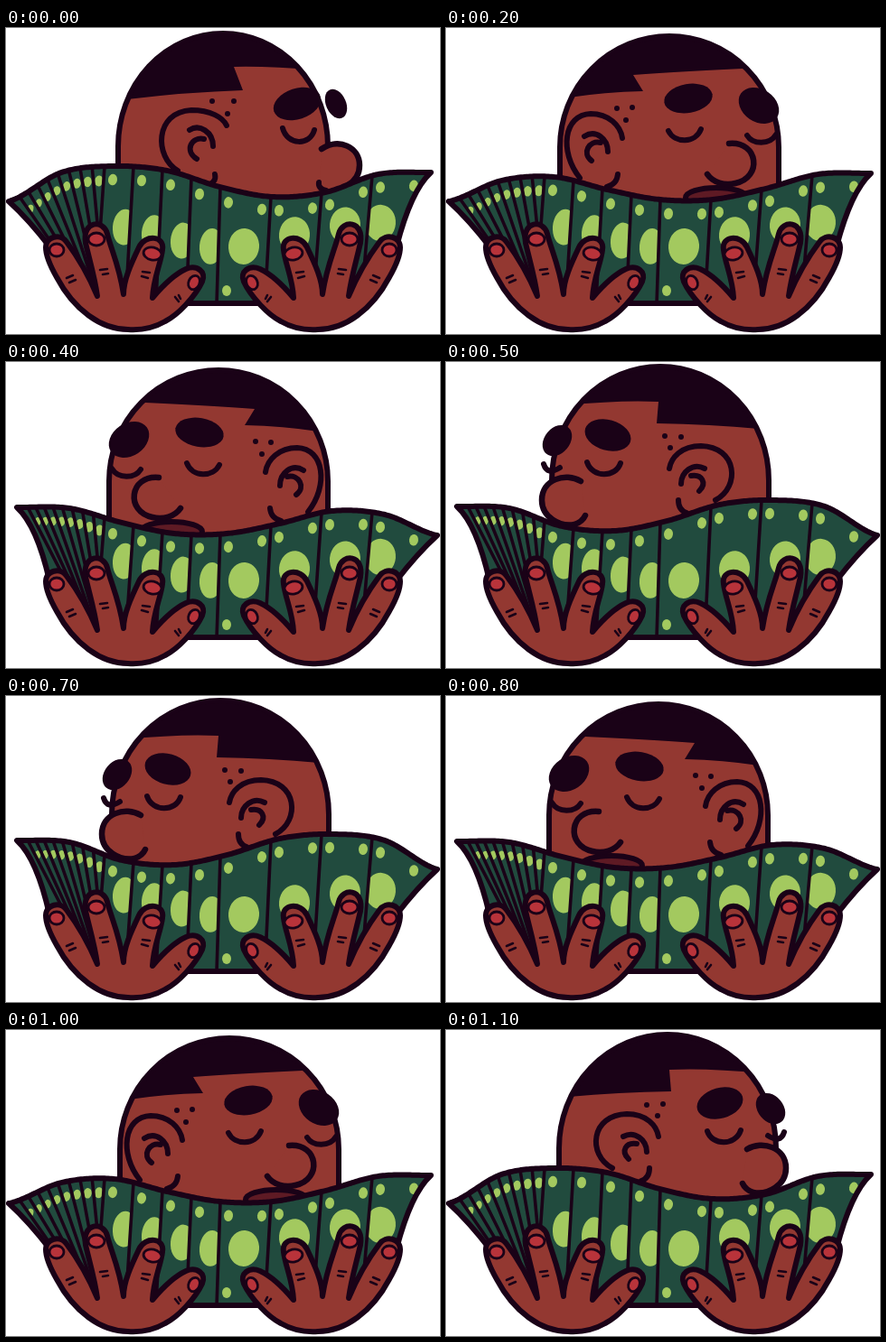
These frames come from a looping animation (480x339 px, 1200 ms). An HTML page with a canvas:

```html
<!DOCTYPE html>
<html lang="en">
<head>
<meta charset="utf-8">
<title>Cash fan</title>
<style>
html, body { margin: 0; width: 100%; height: 100%; overflow: hidden; background: #fff; }
canvas { display: block; }
</style>
</head>
<body>
<canvas id="stage" width="480" height="339"></canvas>
<script>
const ctx = document.getElementById('stage').getContext('2d');
const INK = '#1a0217', SKIN = '#933831', GREEN = '#214b3e', LIME = '#a3c95f', NAIL = '#b8333a', LIP = '#5e1a24';

// Head turns from profile (0) to front (3); later poses reuse them mirrored.
const heads = [
  {
    skull: [240, 131, 116, 125],
    hair: 'M100 84 L134 79 Q200 71 262 69 L252 43 Q290 42 345 47 L345 -5 L100 -5Z',
    brows: [[322, 84, 27, 17, -18], [365, 84, 11, 17, -24]],
    nose: 'M349 134 C368 121 391 132 391 152 C391 164 385 170 378 174',
    chin: 'L380 180 L346 190',
    lines: 'M306 111 C311 130 336 131 341 113 M190 158 C164 143 164 93 205 91 C226 91 240 99 244 108 ' +
      'M203 113 C214 106 229 115 229 131 M219 123 C205 120 197 136 211 145 M231 162 C233 169 228 173 220 175 M346 171 Q345 178 354 180',
    dots: [[228, 81], [252, 81], [245, 95]]
  },
  {
    skull: [245, 131, 120, 126],
    hair: 'M100 80 L136 74 Q190 69 249 68 L247 44 Q290 42 350 48 L350 -5 L100 -5Z',
    brows: [[303, 81, 26, 17, -16], [359, 87, 14, 19, -40]],
    nose: 'M333 132 C350 122 376 130 376 153 C376 172 356 183 340 180 Q331 177 328 170',
    chin: '',
    lines: 'M289 112 C294 128 320 129 326 111 M356 117 Q370 126 374 113 M184 153 C156 138 160 94 200 93 C222 93 233 106 235 118 ' +
      'M196 118 C209 111 222 122 222 135 M211 126 C199 124 193 134 202 143 M225 153 Q225 164 216 167',
    dots: [[222, 83], [240, 82], [234, 95]]
  },
  {
    skull: [247, 132, 121, 123],
    hair: 'M100 83 L136 77 Q175 71 218 70 L207 52 Q260 48 350 44 L350 -5 L100 -5Z',
    brows: [[268, 78, 27, 16, -10], [346, 86, 24, 18, 34]],
    mouth: [299, 188, 34, 11],
    nose: 'M313 128 C346 125 350 166 320 172 C308 175 295 171 289 162',
    chin: '',
    lines: 'M246 114 C253 128 276 128 282 112 M333 119 C339 129 358 130 365 118 M148 166 C125 137 130 96 160 95 C180 95 193 108 195 122 ' +
      'M153 120 C166 112 179 123 179 137 M171 127 C158 124 150 139 161 147 M190 162 Q189 173 178 176',
    dots: [[189, 89], [206, 88], [199, 102]]
  },
  {
    skull: [247, 125, 121, 123],
    hair: 'M100 80 L160 80 L162 60 Q240 48 325 49 L325 70 L390 70 L390 -5 L100 -5Z',
    ear: 'M128 119 C118 99 79 99 79 137 Q80 155 88 170',
    brows: [[204, 83, 28, 18, -22], [288, 83, 28, 18, 22]],
    mouth: [240, 188, 34, 11],
    nose: 'M229 139 C214 152 222 172 246 172 C272 172 282 152 271 137',
    chin: '',
    lines: 'M184 118 C189 134 212 137 220 124 M272 121 C277 133 302 134 308 119',
    dots: [[137, 97], [150, 93], [142, 107], [342, 84], [353, 87], [344, 97]]
  }
];
const EAR_FOLDS = 'M109 129 Q126 131 130 148 M121 138 Q112 139 112 150';

// Heights of the fan's upper edge at even spacing, also mirrored later.
const right = [192, 160, 153, 158, 176, 187, 182, 162, 160];
const turning = [192, 169, 165, 179, 190, 190, 178, 162, 161];
const front = [191, 170, 170, 184, 191, 184, 167, 154, 162];
const edges = [right, right, turning, front];

const HAND = new Path2D('M135 334 C105 334 75 312 56 276 C48 262 44 252 44 243 C44 231 60 227 67 237 C76 249 88 266 101 297 ' +
  'C98 275 92 256 88 238 C84 213 108 212 112 228 C116 245 125 262 130 295 C130 279 138 262 147 243 C154 228 176 230 173 246 ' +
  'C171 262 163 277 162 299 C172 287 186 273 199 267 C211 262 222 270 217 281 C209 298 190 318 176 325 C164 332 150 335 135 334Z');
const CREASES = new Path2D('M67 277l7 -3 M70 282l7 -3 M104 268l8 -1 M107 273l6 -1 M151 270l8 1 M150 275l7 2 M187 298l4 5 M191 296l2 4');
const nails = [[56, 246, 8, 7, 0], [100, 234, 9, 7, 0], [162, 250, 10, 7, 12], [208, 282, 6, 8, 25]];

function stroke(path, width) {
  ctx.lineWidth = width;
  ctx.strokeStyle = INK;
  ctx.stroke(path);
}

function fill(path, color) {
  ctx.fillStyle = color;
  ctx.fill(path);
}

function oval(x, y, rx, ry, deg, color, outline) {
  const p = new Path2D();
  p.ellipse(x, y, rx, ry, deg * Math.PI / 180, 0, 7);
  fill(p, color);
  if (outline) stroke(p, outline);
}

function mirrored(width, draw) {
  ctx.save();
  ctx.translate(width, 0);
  ctx.scale(-1, 1);
  draw();
  ctx.restore();
}

function drawEar(ear) {
  fill(new Path2D(ear + ' L138 180 L138 119Z'), SKIN);
  stroke(new Path2D(ear + EAR_FOLDS), 6);
}

function drawHead(h) {
  const [cx, cy, rx, ry] = h.skull;
  const skull = new Path2D();
  skull.moveTo(cx - rx, 215);
  skull.lineTo(cx - rx, cy);
  skull.ellipse(cx, cy, rx, ry, 0, Math.PI, 2 * Math.PI);
  skull.lineTo(cx + rx, 215);
  fill(skull, SKIN);
  ctx.save();
  ctx.clip(skull);
  fill(new Path2D(h.hair), INK);
  ctx.restore();
  stroke(skull, 6);
  if (h.ear) {
    drawEar(h.ear);
    mirrored(2 * cx, () => drawEar(h.ear));
  }
  fill(new Path2D(h.nose + h.chin), SKIN);
  if (h.mouth) oval(...h.mouth, 0, LIP, 6);
  stroke(new Path2D(h.nose), 6.5);
  stroke(new Path2D(h.lines), 6);
  for (const b of h.brows) oval(...b, INK);
  for (const [x, y] of h.dots) oval(x, y, 3, 3, 0, INK);
}

// Catmull-Rom through evenly spaced heights, u from 0 to 1.
function curve(ys, u) {
  const n = ys.length - 1, i = Math.min(n - 1, Math.floor(u * n)), t = u * n - i;
  const a = ys[Math.max(0, i - 1)], b = ys[i], c = ys[i + 1], d = ys[Math.min(n, i + 2)];
  return b + t / 2 * (c - a + t * (2 * a - 5 * b + 4 * c - d + t * (3 * (b - c) + d - a)));
}

// Narrow bills crowd at the left, wide ones follow.
function foldsFrom(tip) {
  const folds = [];
  for (let k = 0; k < 8; k++) {
    const t = k / 8;
    folds.push(tip + 12 + (97 - tip) * t * (0.8 + 0.2 * t));
  }
  for (let k = 4; k > 0; k--) folds.push(237 - 32 * k);
  for (let k = 0; k < 4; k++) folds.push(237 + 56 * k);
  return folds;
}

function drawFan(pose) {
  const flipped = pose > 3;
  const ys = flipped ? [...edges[6 - pose]].reverse() : edges[pose];
  const x0 = flipped ? 12 : 3, x1 = flipped ? 477 : 470;
  const top = x => curve(ys, Math.min(1, Math.max(0, (x - x0) / (x1 - x0))));

  const shape = new Path2D();
  for (let x = x0; x < x1; x += 2) shape.lineTo(x, top(x));
  shape.lineTo(x1, top(x1));
  shape.quadraticCurveTo(x1 - 22, top(x1) + 20, 432, 242);
  shape.lineTo(390, 290);
  shape.lineTo(295, 305);
  shape.lineTo(195, 305);
  shape.lineTo(90, 290);
  shape.lineTo(48, 242);
  shape.quadraticCurveTo(x0 + 22, top(x0) + 20, x0, top(x0));
  shape.closePath();
  fill(shape, GREEN);

  const spot = x => oval(x, top(x) + 15, 5, 6.3, 8, LIME);
  const folds = foldsFrom(x0);
  ctx.save();
  ctx.clip(shape);
  // Each bill overlaps the one on its left.
  folds.forEach((x, i) => {
    const y = top(x), next = folds[i + 1] || 461;
    const narrow = x < 105, wide = x >= 237;
    const foot = narrow ? x + (112 - x) * 0.85 : x - 4 - Math.abs(x - 237) * 0.05;
    const bill = new Path2D();
    bill.moveTo(x, y - 12);
    bill.lineTo(x, y);
    bill.lineTo(foot, 306);
    bill.lineTo(480, 320);
    bill.lineTo(480, 120);
    fill(bill, GREEN);
    ctx.save();
    ctx.clip(bill);
    if (narrow) {
      const mid = (x + next) / 2, size = 3 + mid / 60;
      oval(mid + (110 - mid) * 0.08, top(mid) + 16, size, size + 1.3, 10, LIME);
    } else {
      spot(x + 9);
      if (wide) spot(next - 10);
      const bx = wide ? Math.min(x + 26, 414) : next - 10;
      const sag = Math.exp(-(((bx - 245) / 90) ** 2));
      oval(bx, 215 + 28 * sag, wide ? 17 : 13, 20, 5, LIME);
      if (x === 237) oval(244, 291, 5, 6, 0, LIME);
    }
    ctx.restore();
    const fold = new Path2D();
    fold.moveTo(x, y);
    fold.lineTo(foot, 306);
    stroke(fold, 3.6);
  });
  ctx.restore();
  stroke(shape, 6);
}

function drawHand() {
  fill(HAND, SKIN);
  stroke(HAND, 6);
  for (const n of nails) oval(...n, NAIL, 2.8);
  stroke(CREASES, 2.6);
}

function draw(pose) {
  ctx.fillStyle = '#fff';
  ctx.fillRect(0, 0, 480, 339);
  ctx.lineCap = ctx.lineJoin = 'round';
  if (pose > 3) mirrored(482, () => drawHead(heads[6 - pose]));
  else drawHead(heads[pose]);
  drawFan(pose);
  drawHand();
  mirrored(480, drawHand);
}

// Twelve held steps: seven poses there and back.
let shown = -1;
const start = performance.now();
function tick(now) {
  const step = Math.floor(Math.max(0, now - start) % 1200 / 100);
  const pose = step > 6 ? 12 - step : step;
  if (pose !== shown) draw(shown = pose);
  requestAnimationFrame(tick);
}
tick(start);
</script>
</body>
</html>
```
